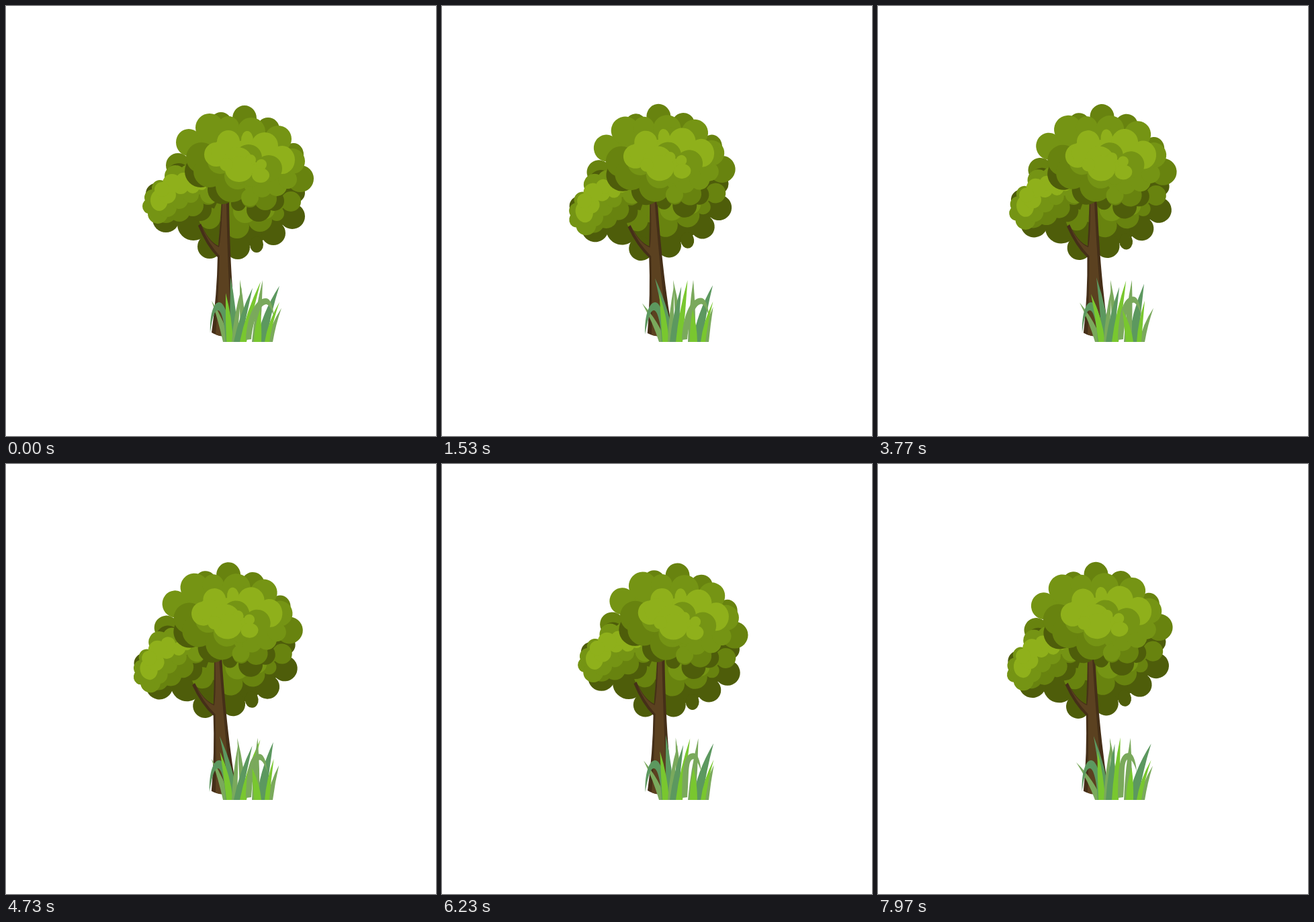
Animation of 640x640 px, one loop 8 s. Source, as an HTML page:

```html
<!DOCTYPE html>
<html lang="en">
<head>
<meta charset="utf-8">
<title>Swaying tree</title>
<style>
  html, body { margin: 0; width: 100%; height: 100%; overflow: hidden; background: #fff; }
  svg { display: block; width: 100vw; height: 100vh; }
</style>
</head>
<body>
<svg viewBox="0 0 640 640">
  <g id="tree">
    <g id="back"></g>
    <g id="trunk">
      <path fill="#452f18" d="M321 286 Q318 340 315 374 Q298 357 286 327 L290 324 Q301 350 316 357 Q319 335 321 286 L332 286 Q333 372 338 432 Q340 462 344 487 Q322 496 306 486 Q314 430 315 372 Z"/>
      <path fill="#5b4120" d="M322 290 L328 290 Q330 400 336 490 Q322 494 312 489 Q316 440 318 372 Q300 352 290 326 Q302 352 317 359 Q321 340 322 290 Z"/>
    </g>
    <g id="side"></g>
    <g id="top"></g>
  </g>
  <g id="grass"></g>
</svg>
<script>
const LOOP = 8000;
const DARK = '#4e5d0a', OLIVE = '#68830f', MID = '#759414', LIGHT = '#8fb01b';
const TEAL = '#5c985f', SAGE = '#7aa95c', LIME = '#79c72f';
const $ = id => document.getElementById(id);

function addPath(parent, fill, d = '') {
  const el = document.createElementNS('http://www.w3.org/2000/svg', 'path');
  el.setAttribute('fill', fill);
  el.setAttribute('d', d);
  parent.appendChild(el);
  return el;
}

// A clump of leaves: round lobes, with the area between their centres filled.
function clump(id, fill, ...lobes) {
  const g = $(id);
  addPath(g, fill, 'M' + lobes.map(([x, y]) => x + ' ' + y).join('L') + 'Z');
  for (const [x, y, rx, ry = rx] of lobes) {
    addPath(g, fill, `M${x - rx} ${y}a${rx} ${ry} 0 1 0 ${2 * rx} 0a${rx} ${ry} 0 1 0 ${-2 * rx} 0Z`);
  }
}

clump('back', OLIVE, [256, 237, 18], [275, 245, 16]);
clump('back', DARK, [257, 252, 18], [279, 325, 24], [303, 358, 18], [345, 359, 18],
  [373, 355, 10, 12], [398, 338, 18], [426, 313, 19], [430, 278, 15], [330, 260, 20]);
clump('back', OLIVE, [303, 316, 16], [344, 328, 18], [378, 318, 18], [403, 309, 11],
  [424, 291, 15], [390, 270, 14], [320, 280, 14]);
clump('back', MID, [356, 305, 18], [386, 303, 14], [360, 285, 14]);

clump('side', DARK, [223, 279, 15], [238, 317, 20], [289, 303, 17], [258, 265, 20]);
clump('side', OLIVE, [225, 284, 13], [238, 306, 17], [258, 305, 16], [278, 297, 16], [301, 282, 14], [258, 258, 18]);
clump('side', MID, [213, 298, 10, 11], [226, 309, 15], [240, 300, 14], [258, 289, 13],
  [275, 281, 12], [303, 280, 14], [272, 250, 14], [252, 253, 16], [229, 271, 12], [218, 285, 12]);
clump('side', LIGHT, [228, 289, 13, 16], [240, 281, 13], [260, 268, 12], [278, 269, 10],
  [291, 266, 8], [264, 259, 11], [247, 264, 14], [232, 273, 11]);

clump('top', DARK, [290, 246, 24], [322, 273, 22], [346, 294, 11], [376, 303, 18], [399, 290, 15], [370, 250, 20]);
clump('top', OLIVE, [320, 174, 16], [355, 167, 18, 19], [390, 183, 17], [428, 221, 15, 17],
  [438, 257, 20], [395, 265, 20], [330, 230, 20]);
clump('top', MID, [272, 203, 19, 20], [303, 181, 21], [331, 180, 16], [365, 187, 21],
  [405, 198, 20], [426, 231, 19], [418, 258, 14], [370, 255, 20], [295, 225, 20]);
clump('top', OLIVE, [291, 226, 23], [303, 246, 24], [336, 268, 24], [363, 288, 12],
  [386, 287, 17], [400, 264, 14], [360, 235, 20]);
clump('top', MID, [319, 231, 19], [345, 253, 20], [363, 285, 13], [381, 270, 15],
  [403, 268, 15], [419, 258, 14], [420, 232, 18], [370, 205, 20]);
clump('top', OLIVE, [396, 240, 14]);
clump('top', LIGHT, [313, 221, 18], [331, 202, 17], [359, 200, 9, 14], [385, 208, 20],
  [411, 229, 19, 21], [350, 235, 20]);
clump('top', MID, [361, 226, 20], [391, 242, 20], [365, 255, 14], [346, 251, 15]);
clump('top', LIGHT, [322, 217, 17], [345, 232, 22], [364, 229, 8], [380, 236, 8],
  [379, 252, 13, 11], [347, 243, 21, 19], [328, 236, 10]);

// Blades: colour, base left, base right, mean tip x, tip y, sway, period, lean.
const blade = (fill, l, r, x, y, amp, period, lean = 0.25) => ({ fill, l, r, x, y, amp, period, lean });

const wave = (t, period) => Math.cos(2 * Math.PI * t / period);

function bladePath({ l, r, x, y, amp, period, lean }, t) {
  const mid = (l + r) / 2;
  const dx = amp * wave(t, period);
  const tx = x + dx;
  const ty = y + dx * (x - mid) / (500 - y);
  const bend = (tx - mid) * lean;
  const cy = (500 + ty) / 2;
  return `M${l} 500Q${l + bend} ${cy} ${tx} ${ty}Q${r + bend} ${cy} ${r} 500Z`;
}

function hookLeft(t) {
  const x = 303 + wave(t, 3750);
  const y = 488 - wave(t, 3750);
  return `M${x} ${y}C${x - 1} 456 310 441 317 441C326 441 332 464 337 499L327 500
    C326 474 321 452 315 453C309 454 306 470 ${x} ${y}Z`;
}

function hookRight(t) {
  const x = 380 + 7 * wave(t, 15000);
  const y = 432.5 + 2.5 * wave(t, 15000);
  return `M357 497C358 465 ${x - 17} ${y} ${x} ${y}Q${x + 9} ${y} ${x + 12} ${y + 28}
    Q${x + 6} ${y + 9} ${x} ${y + 9}C${x - 9} ${y + 10} 368 465 365 496Z`;
}

const grass = [
  blade(SAGE, 323, 333, 300, 441.5, 6, 5000, 0.3),
  { fill: TEAL, draw: hookLeft },
  blade(TEAL, 334, 345, 325.5, 404, 8.5, 3000),
  blade(LIME, 328, 338, 322, 428, 5, 7500),
  blade(SAGE, 349, 358, 346, 407.5, 2, 3000),
  blade(SAGE, 336, 344, 348, 418, 3, 3000),
  blade(TEAL, 339, 350, 359, 418, 8, 5000, 0.35),
  blade(LIME, 348, 358, 369, 408.5, 10, 5000, 0.35),
  blade(TEAL, 373, 387, 401.5, 415, 5.5, 7500),
  { fill: SAGE, draw: hookRight },
  blade(SAGE, 366, 377, 378, 408, 4, 3000, 0.4),
  blade(LIME, 369, 380, 371, 452, 7, 7500),
  blade(SAGE, 389, 397, 406.5, 448.5, 3.5, 3750),
  blade(LIME, 385, 392, 402, 439.5, 5, 7500)
].map(b => ({ path: addPath($('grass'), b.fill), draw: b.draw || (t => bladePath(b, t)) }));

function turn(id, angle, x, y) {
  $(id).setAttribute('transform', `rotate(${angle} ${x} ${y})`);
}

function render(t) {
  const slow = wave(t, 3000) - 1;
  const fast = wave(t, 2170) - 1;
  turn('tree', 1.65 * slow, 322, 490);
  turn('side', 5 * slow, 290, 326);
  turn('back', 3.4 * fast, 326, 350);
  turn('top', 3.4 * fast, 326, 350);
  for (const b of grass) b.path.setAttribute('d', b.draw(t));
}

const start = performance.now();
function tick() {
  render((performance.now() - start) % LOOP);
  requestAnimationFrame(tick);
}
tick();
</script>
</body>
</html>
```
